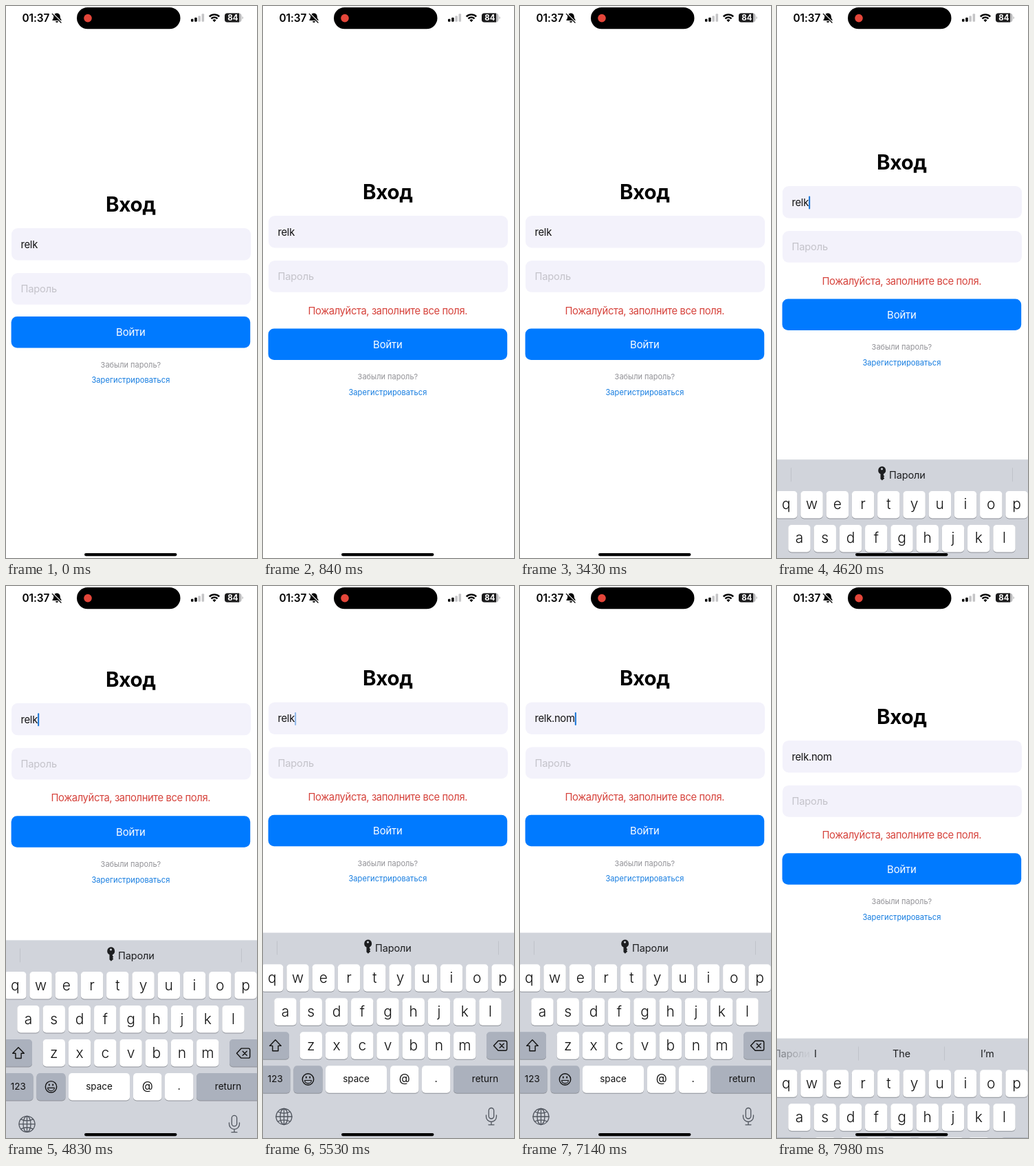
These frames come from a looping animation (365x800 px, 8 s). An HTML page:

```html
<!DOCTYPE html>
<html lang="ru">
<head>
<meta charset="utf-8">
<title>Вход</title>
<style>
  html, body { margin: 0; width: 100%; height: 100%; overflow: hidden; background: #fff; }
  svg { display: block; width: 365px; height: 800px; }
  text { font-family: Inter, Roboto, sans-serif; white-space: pre; }
  .mid { text-anchor: middle; }
  .line { fill: none; stroke-linecap: round; stroke-linejoin: round; }
</style>
</head>
<body>
<svg viewBox="0 0 365 800">
  <defs>
    <linearGradient id="fade" gradientUnits="userSpaceOnUse" x1="164" x2="210" y1="0" y2="0">
      <stop offset="0" stop-color="#63666c"/>
      <stop offset="1" stop-color="#63666c" stop-opacity="0.1"/>
    </linearGradient>
  </defs>
  <rect width="365" height="800" fill="#fff"/>

  <g id="form">
    <text class="mid" x="181.2" y="-24" font-size="29.6" font-weight="700" letter-spacing="-0.4">Вход</text>
    <rect x="8" width="348" height="46.5" rx="9" fill="#f3f2fb"/>
    <text id="login" x="21.5" y="29" font-size="14.8" letter-spacing="-0.3" fill="#111"></text>
    <rect id="caret" y="14.5" width="2" height="19" rx="1" fill="#1673d4"/>
    <g id="pass">
      <rect x="8" y="65" width="348" height="45.8" rx="9" fill="#f3f2fb"/>
      <text x="21.5" y="93.3" font-size="14.7" letter-spacing="-0.2" fill="#c4c3ca">Пароль</text>
    </g>
    <text id="error" class="mid" x="181.3" y="142.5" font-size="14.8" letter-spacing="-0.4" fill="#d6433c">Пожалуйста, заполните все поля.</text>
    <g id="actions">
      <rect x="7.6" y="128" width="347.6" height="45.5" rx="8.5" fill="#007aff"/>
      <text class="mid" x="181.4" y="156.4" font-size="14.8" letter-spacing="-0.1" fill="#fff">Войти</text>
      <text class="mid" x="181.4" y="202" font-size="11" fill="#919196">Забыли пароль?</text>
      <text class="mid" x="181.4" y="224.4" font-size="11.1" letter-spacing="0.06" fill="#147ce0">Зарегистрироваться</text>
    </g>
  </g>

  <g id="keyboard">
    <rect width="365" height="310" fill="#d1d4db"/>
    <g id="passwords">
      <path fill="#1d1e20" fill-rule="evenodd" d="M152.5 10a5.8 5.8 0 0 1 2.4 11v1.6l1.4 1.5-1.4 1.5 1.4 1.5-3.4 3.2-2.4-2.2V21a5.8 5.8 0 0 1 2-11zm0 2.2a1.5 1.5 0 1 0 .01 0z"/>
      <text id="passLabel" x="163" y="27.6" font-size="14.5" letter-spacing="-0.1" fill="#1d1e20">Пароли</text>
    </g>
    <path id="edges" d="M20.5 12v20M342.5 12v20" stroke="#bfc2c9"/>
    <g id="hints" font-size="14.3" fill="#1d1e20">
      <path d="M118.5 12v20M243.5 12v20" stroke="#bfc2c9"/>
      <text class="mid" x="56" y="27.6">I</text>
      <text class="mid" x="181" y="27.6">The</text>
      <text class="mid" x="306" y="27.6">I’m</text>
    </g>
    <g id="keys"></g>
    <g class="line" stroke="#111" stroke-width="1.4">
      <path d="M18 155.3l8.3 8.6h-4.2v7.3h-8.2v-7.3H9.7z"/>
      <path d="M342 156.8h10.5a2.2 2.2 0 0 1 2.2 2.2v9.6a2.2 2.2 0 0 1-2.2 2.2H342l-6.5-7z"/>
      <path d="M344.2 160.8l6 6m0-6l-6 6"/>
      <circle cx="65.5" cy="212.5" r="8.2"/>
      <path d="M60.6 214h9.8a4.9 4.4 0 0 1-9.8 0z" stroke-width="1.1"/>
      <path d="M62.8 209v1.2m5.4-1.2v1.2" stroke-width="1.8"/>
    </g>
    <g class="line" stroke="#50555e" stroke-width="1.3">
      <circle cx="30.5" cy="266.5" r="11.5"/>
      <ellipse cx="30.5" cy="266.5" rx="5.5" ry="11.5"/>
      <path d="M30.5 255v23M19 266.5h23M21.8 259.5q8.7 4.2 17.4 0M21.8 273.5q8.7-4.2 17.4 0"/>
      <rect x="328.3" y="254" width="7.4" height="15.5" rx="3.7"/>
      <path d="M324.5 264.5v2a7.5 7.5 0 0 0 15 0v-2M332 274v4.3m-4 0h8"/>
    </g>
  </g>

  <g id="status">
    <text x="23.5" y="22.7" font-size="15.4" font-weight="600" letter-spacing="-0.1">01:37</text>
    <path d="M74 10.5c3.4 0 4.7 2.5 4.8 5.3.1 2.3.8 3 1.7 4.2v1H67.5v-1c.9-1.2 1.6-1.9 1.7-4.2.1-2.8 1.4-5.3 4.8-5.3zM72 22h4a2 2 0 0 1-4 0z"/>
    <path d="M68.3 10.6L81 23.3" stroke="#fff" stroke-width="1.3"/>
    <path d="M67.3 11.4L80 24" class="line" stroke="#000" stroke-width="1.3"/>
    <rect x="103" y="2" width="150.5" height="31.2" rx="15.6"/>
    <circle cx="119" cy="17.6" r="5.8" fill="#e4463a"/>
    <g id="bars"></g>
    <path d="M295.8 15.4a10.2 10.2 0 0 1 14.4 0M298.5 18.3a6.3 6.3 0 0 1 9 0" fill="none" stroke="#000" stroke-width="2.4"/>
    <path d="M303 23.2l-2.5-2.6a3.5 3.5 0 0 1 5 0z"/>
    <rect x="318" y="10.5" width="24.5" height="13" rx="4" fill="#b9b9bb"/>
    <path d="M322 10.5h17v13h-17a4 4 0 0 1-4-4v-5a4 4 0 0 1 4-4z" fill="#1b1b1c"/>
    <path d="M343.5 15v4.2q1.5-.6 1.5-2.1t-1.5-2.1z" fill="#b9b9bb"/>
    <text class="mid" x="330" y="21.2" font-size="11.5" font-weight="700" fill="#fff">84</text>
    <rect x="114" y="793" width="134.5" height="4.2" rx="2.1"/>
  </g>
</svg>

<script>
const LOOP = 8000;
const FIRST_TAP = 390, SECOND_TAP = 1890;
const FOCUS = 4524, BLUR = 7878;
const FORM_UP = 4577, FORM_DOWN = 7927;
const LOGIN = 'relk', SUFFIX = '.nom';
const KEY_TIMES = [6090, 6340, 6590, 6850];

const $ = id => document.getElementById(id);
const clamp = v => Math.max(0, Math.min(1, v));
const mix = (a, b, p) => a + (b - a) * p;

function add(parent, tag, attrs, label) {
  const el = document.createElementNS('http://www.w3.org/2000/svg', tag);
  for (const name in attrs) el.setAttribute(name, attrs[name]);
  if (label) el.textContent = label;
  return parent.appendChild(el);
}

function key(x, y, width, label, size, dark) {
  const box = { x, width, height: 39.5, rx: 5 };
  add($('keys'), 'rect', { ...box, y: y + 1, fill: '#8f9299' });
  add($('keys'), 'rect', { ...box, y, fill: dark ? '#abb1bd' : '#fff' });
  if (!label) return;
  const letter = size > 20;
  add($('keys'), 'text', {
    class: 'mid', x: x + width / 2, y: y + (letter ? 26.5 : 24.2), 'font-size': size,
    'font-weight': letter ? 300 : 400, fill: '#111'
  }, label);
}

function buildKeys() {
  [['qwertyuiop', 13.3], ['asdfghjkl', 32.5], ['zxcvbnm', 69.8]].forEach(([row, x], r) =>
    [...row].forEach((c, i) => key(x - 16.2 + i * 37.25, 45.7 + r * 49, 32.4, c, 21)));
  key(-4, 143.7, 42, '', 0, true);
  key(325, 143.7, 44, '', 0, true);
  key(-4, 192.7, 43.5, '123', 13.5, true);
  key(44.5, 192.7, 42, '', 0, true);
  key(91, 192.7, 89, 'space', 13.5);
  key(185, 192.7, 41.5, '@', 16.5);
  key(231, 192.7, 41.5, '.', 15);
  key(277, 192.7, 92, 'return', 13.5, true);
}

function buildBars() {
  [4, 6, 8.5, 11.5].forEach((height, i) => add($('bars'), 'rect', {
    x: 269 + i * 5.2, y: 22.7 - height, width: 3.5, height, rx: 1,
    fill: i < 2 ? '#000' : '#c5c5c7'
  }));
}

// Critically damped spring, time in ms.
function spring(ms, rate) {
  const x = Math.max(0, ms) * rate / 1000;
  return 1 - (1 + x) * Math.exp(-x);
}

const rise = (t, up, down, rate) => spring(t - up, rate) * (1 - spring(t - down, rate));

function shake(ms) {
  const u = ms / 140;
  return u > 0 && u < 1 ? 6 * Math.sin(3 * Math.PI * u) : 0;
}

function caretOpacity(t, typed) {
  if (t < FOCUS || t >= BLUR) return 0;
  const last = typed ? KEY_TIMES[typed - 1] : FOCUS;
  return clamp((Math.abs((t - last) % 1100 - 860) - 80) / 140);
}

const show = (id, on) => $(id).setAttribute('visibility', on ? 'visible' : 'hidden');
const move = (id, x, y) => $(id).setAttribute('transform', `translate(${x} ${y})`);

function render(t) {
  const failed = t >= FIRST_TAP;
  const typed = KEY_TIMES.filter(k => t >= k).length;
  const blurred = t >= BLUR;

  move('form', 0, failed ? mix(304, 168.4, rise(t, FORM_UP, FORM_DOWN, 26)) : 322);
  move('pass', shake(t - FIRST_TAP) + shake(t - SECOND_TAP), 0);
  move('actions', 0, failed ? 35.4 : 0);
  show('error', failed);

  $('login').textContent = LOGIN + SUFFIX.slice(0, typed);
  $('caret').setAttribute('x', 21.7 + $('login').getComputedTextLength());
  $('caret').setAttribute('opacity', caretOpacity(t, typed));

  move('keyboard', 0, mix(801, 502.5, rise(t, FOCUS, BLUR, 16.7)));
  move('passwords', -168 * clamp((t - BLUR) / 100), 0);
  $('passLabel').setAttribute('fill', blurred ? 'url(#fade)' : '#1d1e20');
  show('edges', !blurred);
  show('hints', blurred);
}

buildKeys();
buildBars();
const start = performance.now();
function tick() {
  render((performance.now() - start) % LOOP);
  requestAnimationFrame(tick);
}
tick();
</script>
</body>
</html>
```
